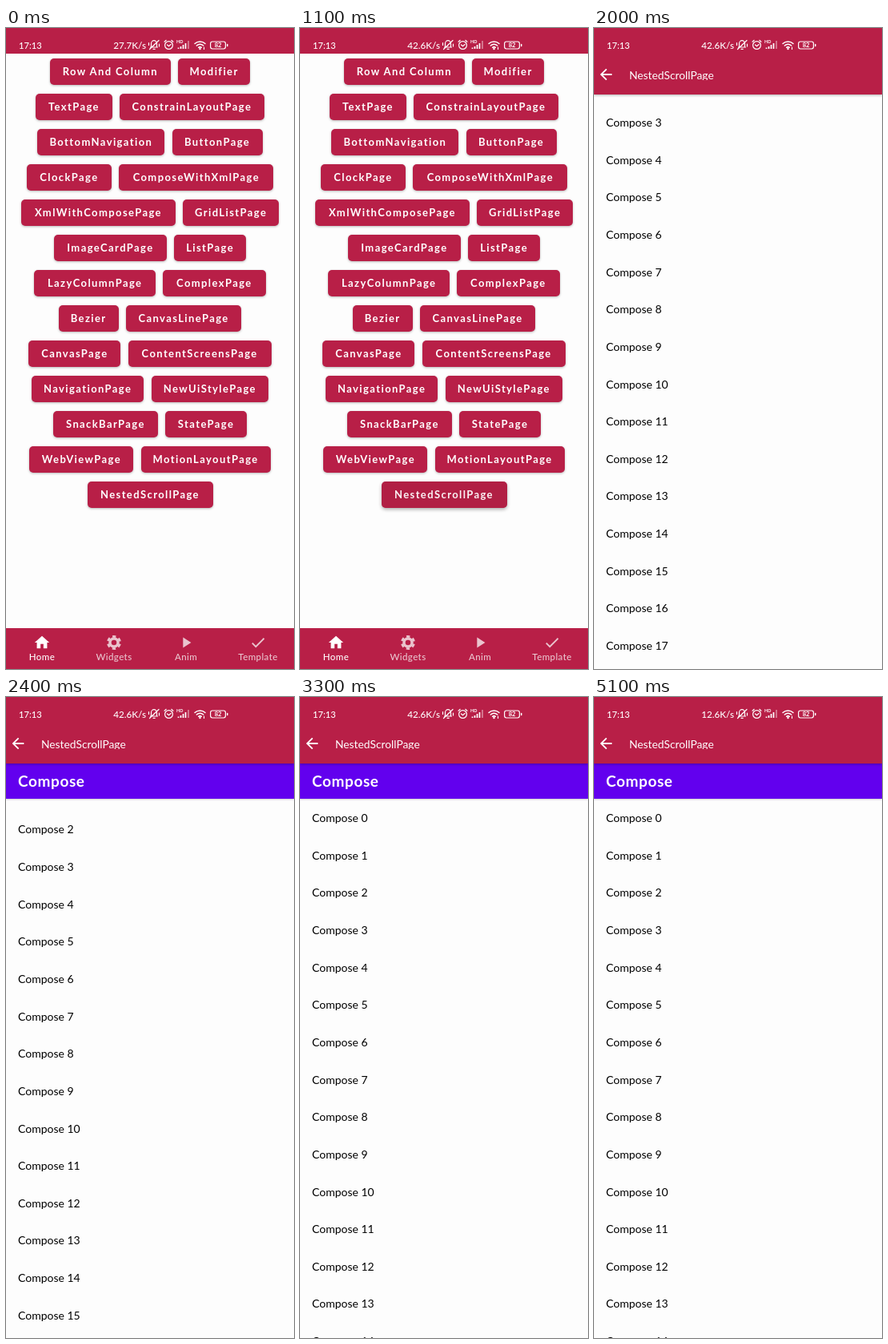
These frames come from a looping animation (360x800 px, 5.2 s). An HTML page:

```html
<!DOCTYPE html>
<html lang="en">
<head>
<meta charset="utf-8">
<title>NestedScrollPage</title>
<style>
:root { --red: #b81f47; --paper: #fdfdfd; --purple: #6200ee; }
html, body { margin: 0; width: 100%; height: 100%; overflow: hidden; background: var(--paper); }
body { position: relative; font-family: Lato, "Open Sans", sans-serif; color: #fff; }
div, svg, span { position: absolute; white-space: nowrap; }
.page { left: 0; top: 0; width: 360px; height: 800px; overflow: hidden; background: var(--paper); }
#status { left: 0; top: 0; width: 360px; height: 32px; background: var(--red); font-weight: 500; }
#status svg { left: 0; top: 0; }
#clock { left: 16px; top: 14px; font-size: 11.2px; line-height: 15px; }
#speed { right: 185px; top: 14px; font-size: 11.7px; line-height: 15px; }

.row { left: 0; width: 360px; height: 33px; display: flex; justify-content: center; gap: 9.2px; }
.btn { position: relative; height: 33px; line-height: 33px; border-radius: 5px; overflow: hidden;
  background: var(--red); text-align: center; font-size: 13px; font-weight: 700;
  letter-spacing: 1.4px; box-shadow: 0 1px 3px rgba(0, 0, 0, .28); }
.btn span { position: relative; }
#ripple { left: 63px; top: 16px; width: 0; height: 0; border-radius: 50%; background: #a31f40;
  transform: translate(-50%, -50%); }

#nav { left: 0; top: 749px; width: 360px; height: 51px; background: var(--red); }
.tab { top: 0; width: 90px; height: 51px; text-align: center; color: #eac4ce; font-size: 11.5px;
  letter-spacing: .4px; font-weight: 500; }
.tab.on { color: #fff; }
.tab svg { left: 34px; top: 7px; }
.tab span { left: 0; width: 90px; top: 28px; line-height: 16px; }

#bar { left: 0; top: 0; width: 360px; height: 83px; background: var(--red);
  box-shadow: 0 1px 3px rgba(0, 0, 0, .3); }
#bar svg { left: 3.7px; top: 46.5px; }
#title { left: 44px; top: 50px; height: 14.5px; line-height: 18px; overflow: hidden; font-size: 13.8px; }
#head { left: 0; top: 83px; width: 360px; height: 44px; line-height: 44px; background: var(--purple);
  box-shadow: 0 1px 2px rgba(0, 0, 0, .2); }
#head span { left: 15px; font-size: 19px; font-weight: 700; letter-spacing: .6px; }
#list { left: 15px; top: 128px; color: #000; font-size: 14px; }
#list div { height: 46.65px; line-height: 46.65px; }
</style>
</head>
<body>
<div class="page" id="home">
  <div id="rows"></div>
  <div id="nav"></div>
</div>
<div class="page" id="scroller">
  <div id="list"></div>
  <div id="head"><span>Compose</span></div>
  <div id="bar">
    <svg width="22" height="22" viewBox="0 0 24 24" fill="#fff"><path d="M20 11H7.83l5.59-5.59L12 4l-8 8 8 8 1.41-1.41L7.83 13H20z"/></svg>
    <span id="title">NestedScrollPage</span>
  </div>
</div>
<div id="status">
  <span id="clock">17:13</span>
  <span id="speed"></span>
  <svg width="360" height="32" fill="none" stroke="#fff" stroke-width="1.2" stroke-linecap="round">
    <!-- muted bell -->
    <path d="M180.5 24h9M181.5 23.5v-4a3.5 3.8 0 0 1 7 0v4M184 26.3h2.2M179.5 26.5l11.5-11M178.5 18.5v3M191.5 20v3"/>
    <!-- alarm -->
    <circle cx="203.5" cy="21.5" r="4.9"/>
    <path d="M201.5 21l2 1.8 2.5-2.3M198 17.2l2.2-1.9M209 17.2l-2.2-1.9"/>
    <!-- signal -->
    <path d="M215.5 26v-1.5M218.5 26v-3M221.5 26v-5M224.5 26v-7" stroke-width="1.7" stroke-linecap="butt"/>
    <path d="M228 26v-10" stroke-width="1.7" stroke-linecap="butt" opacity=".45"/>
    <!-- wifi -->
    <path d="M236 19.5a9.5 9.5 0 0 1 13 0M238.3 22a6 6 0 0 1 8.4 0M240.7 24.3a3 3 0 0 1 3.6 0" stroke-width="1.5"/>
    <circle cx="242.5" cy="26" r=".6" fill="#fff"/>
    <path d="M247.5 24v2.5" stroke-width="1.1"/>
    <!-- battery -->
    <rect x="255.6" y="17" width="18.8" height="9" rx="2.4"/>
    <path d="M276.7 20.5v2" stroke-width="1.5"/>
    <g fill="#fff" stroke="none" font-family="Lato, sans-serif" font-weight="700">
      <text x="265" y="24.3" font-size="7.5" text-anchor="middle">82</text>
      <text x="213" y="18.8" font-size="5.5">HD</text>
    </g>
  </svg>
</div>
<script>
const $ = id => document.getElementById(id);
const LOOP = 5200, STEP = 100;
const PRESS = 600, RELEASE = 900, OPEN = 1200;
const HEAD = 44;

const rows = [
  [["Row And Column", 151], ["Modifier", 90]],
  [["TextPage", 95.5], ["ConstrainLayoutPage", 181]],
  [["BottomNavigation", 159], ["ButtonPage", 113]],
  [["ClockPage", 106.5], ["ComposeWithXmlPage", 193]],
  [["XmlWithComposePage", 193], ["GridListPage", 120]],
  [["ImageCardPage", 141], ["ListPage", 90]],
  [["LazyColumnPage", 151.5], ["ComplexPage", 128.5]],
  [["Bezier", 75], ["CanvasLinePage", 144.5]],
  [["CanvasPage", 115], ["ContentScreensPage", 179]],
  [["NavigationPage", 140.5], ["NewUiStylePage", 146.5]],
  [["SnackBarPage", 131], ["StatePage", 102]],
  [["WebViewPage", 130], ["MotionLayoutPage", 162]],
  [["NestedScrollPage", 157]]
];
$("rows").innerHTML = rows.map((row, i) =>
  `<div class="row" style="top:${37.5 + 44 * i}px">` +
  row.map(([name, w]) => `<div class="btn" style="width:${w}px"><span>${name}</span></div>`).join("") +
  "</div>").join("");

const tabs = [
  ["Home", '<path d="M10 20v-6h4v6h5v-8h3L12 3 2 12h3v8z"/>'],
  ["Widgets", '<g fill="none" stroke="currentColor"><circle cx="12" cy="12" r="5.5" stroke-width="3.8"/>' +
    '<circle cx="12" cy="12" r="8.3" stroke-width="3" stroke-dasharray="4.7 3.99" stroke-dashoffset="-2"/></g>'],
  ["Anim", '<path d="M8 5v14l11-7z"/>'],
  ["Template", '<path d="M9 16.17L4.83 12l-1.42 1.41L9 19 21 7l-1.41-1.41z"/>']
];
$("nav").innerHTML = tabs.map(([name, icon], i) =>
  `<div class="tab${i ? "" : " on"}" style="left:${90 * i}px">` +
  `<svg width="22" height="22" viewBox="0 0 24 24" fill="currentColor">${icon}</svg><span>${name}</span></div>`).join("");

$("list").innerHTML = Array.from({ length: 30 }, (_, i) =>
  `<div style="top:${46.65 * i}px">Compose ${i}</div>`).join("");

const target = $("rows").lastChild.firstChild;
const label = target.firstChild;
const ripple = document.createElement("div");
ripple.id = "ripple";
target.prepend(ripple);

// Turning points of the finger: time, list offset
const turns = [[1450, 0], [2100, 184], [2650, 0], [3000, 85.7], [3290, 0]];
const clamp = (v, lo, hi) => Math.min(hi, Math.max(lo, v));
const ease = p => (1 - Math.cos(Math.PI * p)) / 2;

// The heading follows each scroll delta, limited to its own height
function scrollAt(t) {
  let list = 0, head = 0;
  for (let i = 1; i < turns.length; i++) {
    const [t0, a] = turns[i - 1], [t1, b] = turns[i];
    if (t <= t0) break;
    const next = a + (b - a) * ease(clamp((t - t0) / (t1 - t0), 0, 1));
    head = clamp(head + next - list, 0, HEAD);
    list = next;
  }
  return { list, head };
}

function render(t) {
  $("speed").textContent = (t < 500 ? "27.7" : t < 4500 ? "42.6" : "12.6") + "K/s";
  $("scroller").style.display = t < OPEN ? "none" : "block";

  // the ripple grows while pressed, then fades
  const lit = t > PRESS ? clamp(1 - (t - RELEASE) / (OPEN - RELEASE), 0, 1) : 0;
  const size = 2 * clamp(43 + (t - PRESS - 100) * 0.3, 0, 100);
  ripple.style.width = ripple.style.height = size + "px";
  ripple.style.opacity = lit;
  label.style.opacity = 1 - 0.15 * lit;
  target.style.boxShadow = `0 ${1 + 3 * lit}px ${3 + 5 * lit}px rgba(0, 0, 0, ${0.28 + 0.1 * lit})`;

  const { list, head } = scrollAt(t);
  $("list").style.transform = `translateY(${-list}px)`;
  $("head").style.transform = `translateY(${-head}px)`;
  // fully tucked away, it leaves no edge under the bar
  $("head").style.visibility = head < HEAD ? "" : "hidden";
}

const start = performance.now();
function tick() {
  const t = (performance.now() - start) % LOOP;
  render(Math.floor(t / STEP) * STEP);
  requestAnimationFrame(tick);
}
tick();
</script>
</body>
</html>
```
